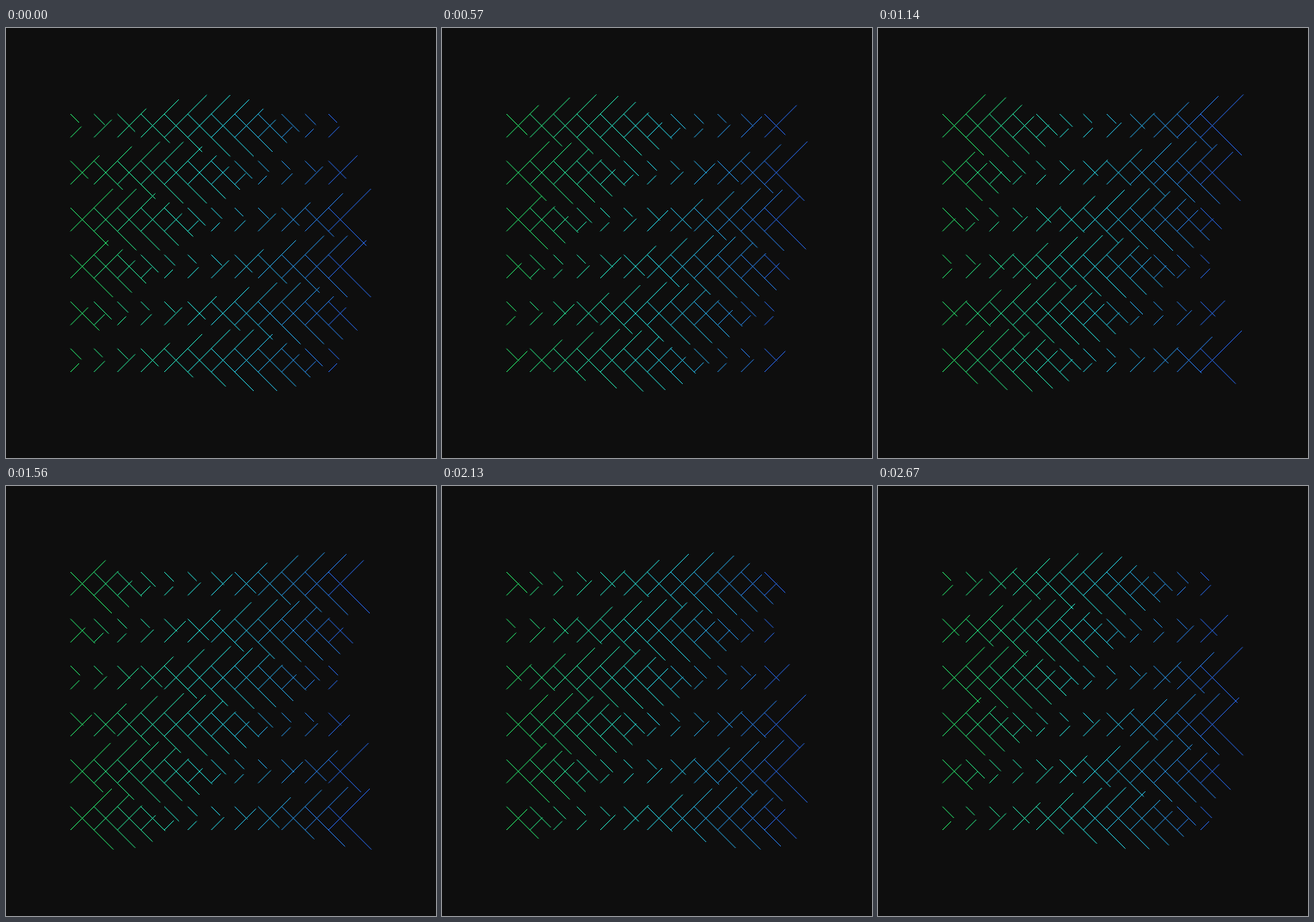
An HTML page with a canvas for the animation above (2.7 s loop, 500 by 500 pixels).

```html
<!DOCTYPE html>
<html lang="en">
<head>
<meta charset="utf-8">
<title>Diagonal wave</title>
<style>
  html, body { margin: 0; width: 100%; height: 100%; overflow: hidden; background: #0e0e0e; }
  canvas { display: block; width: 500px; height: 500px; }
</style>
</head>
<body>
<canvas id="stage" width="500" height="500"></canvas>
<script>
const ctx = document.getElementById('stage').getContext('2d');
const LOOP = 2700;
const COUNT = 12;
const LAST = COUNT - 1;
const STEP = 300 / LAST;
const LEFT = 75;
const TOP = 100;
const SHORT = 10;
const LONG = 50;

const easeInOutQuad = x => x < 0.5 ? 2 * x * x : 1 - 2 * (1 - x) ** 2;

// Eased back-and-forth: 0 at the ends of the cycle, 1 halfway through.
const pulse = cycle => easeInOutQuad(1 - Math.abs(2 * (cycle % 1) - 1));

function draw(time) {
  const progress = (time % LOOP) / LOOP;
  ctx.fillStyle = '#0e0e0e';
  ctx.fillRect(0, 0, 500, 500);
  ctx.lineWidth = 1;

  for (let col = 0; col < COUNT; col++) {
    const x = LEFT + col * STEP;
    ctx.strokeStyle = `hsl(${142 + 78 * col / LAST}, 70%, 50%)`;
    for (let row = 0; row < COUNT; row++) {
      const y = TOP + row * STEP;
      const reach = SHORT + (LONG - SHORT) * pulse((col + row) / LAST + progress);
      const slope = row % 2 ? -1 : 1;
      ctx.beginPath();
      ctx.moveTo(x, y);
      ctx.lineTo(x + reach, y + slope * reach);
      ctx.stroke();
    }
  }
}

const start = performance.now();
function tick() {
  draw(performance.now() - start);
  requestAnimationFrame(tick);
}
tick();
</script>
</body>
</html>
```
